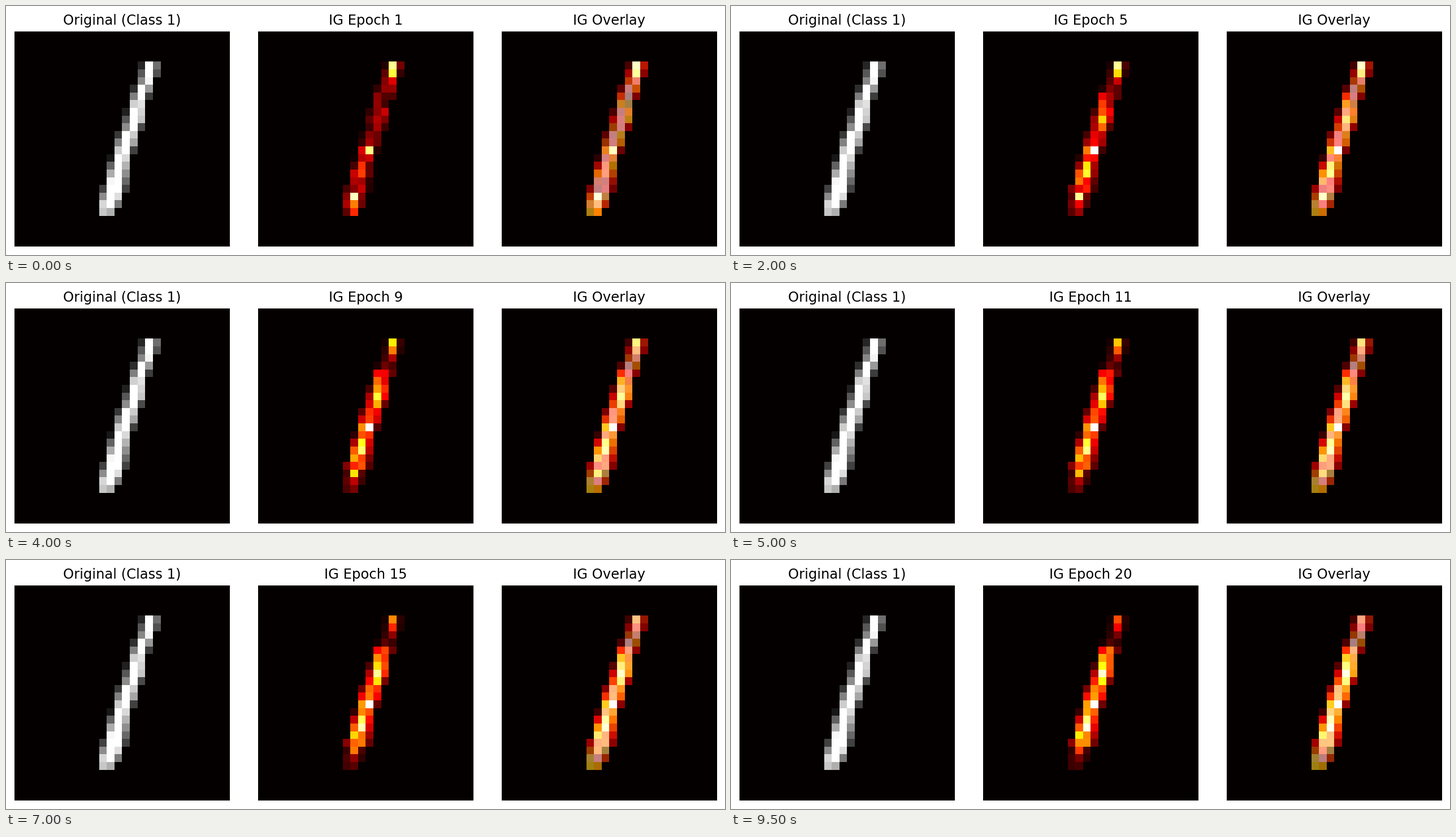
A matplotlib script for the animation above (10000 ms loop, 1272x440 px).

```python
import numpy as np
import matplotlib.pyplot as plt
from matplotlib.animation import FuncAnimation

W, H = 1272, 440
SIZE, EPOCHS = 28, 20
PANEL, PANEL_TOP, BASELINE = 380.4, 45, 33
FIRST_X, PITCH = 14.8, 431.2
BLACK = np.array([5, 0, 0]) / 255

# Corner points (row, column) of the two sides of the stroke
LEFT_SIDE = [(4, 16.85), (6, 16.47), (7, 15.82), (10, 14.87), (12, 14.45),
             (13, 13.78), (22, 11.16), (23, 11.22)]
RIGHT_SIDE = [(4, 18.43), (5, 18.32), (9, 16.88), (11, 16.78), (13, 15.8),
              (14, 15.65), (16, 14.85), (20, 14.26), (22, 13.48), (23, 12.69)]
TOP_ROW, LAST_ROW = 4, 23
BODY = (8, 20)

# Levels below are given at these epochs
KEY_EPOCHS = (1, 5, 20)
CORE_LEVEL = (0.15, 0.28, 0.53)
LEFT_LEVEL = (0.28, 0.58, 0.75)
RIGHT_LEVEL = (0.28, 0.40, 0.60)
TIP_LEVEL = (0.25, 0.18, 0.10)

# Hot spots on the core: row, spread, strength at the key epochs
SPOTS = [(4, 1.1, (0.75, 0.75, 0.38)),
         (11, 0.9, (0.10, 0.40, 0.42)),
         (15, 0.5, (0.70, 0.75, 0.50)),
         (17.6, 0.6, (0.48, 0.72, 0.55)),
         (21, 0.5, (0.80, 0.75, 0.35)),
         (23, 0.8, (0.30, 0.12, 0.03))]


def draw_digit():
    """Coverage of each cell by the stroke."""
    digit = np.zeros((SIZE, SIZE))
    cols = np.arange(SIZE)
    for row in range(TOP_ROW, LAST_ROW + 1):
        a = np.interp(row, *zip(*LEFT_SIDE))
        b = np.interp(row, *zip(*RIGHT_SIDE))
        digit[row] = np.clip(np.minimum(b, cols + 1) - np.maximum(a, cols), 0, 1)
    return digit


def level(values, epoch):
    """Change is fast at first, so blend in the logarithm of the epoch."""
    return np.interp(np.log(epoch), np.log(KEY_EPOCHS), values)


def spot_heat(row, epoch):
    return sum(level(strength, epoch) * np.exp(-((row - centre) / spread) ** 2 / 2)
               for centre, spread, strength in SPOTS)


def attribution(epoch):
    """Input times sensitivity: rims and core, uneven while training is young."""
    gain = np.zeros((SIZE, SIZE))
    for row in range(TOP_ROW, LAST_ROW + 1):
        cells = np.flatnonzero(digit[row])
        inside = BODY[0] <= row <= BODY[1]
        left, core, right = (level(key if inside else TIP_LEVEL, epoch)
                             for key in (LEFT_LEVEL, CORE_LEVEL, RIGHT_LEVEL))
        gain[row, cells] = core
        gain[row, cells[0]] = left
        if len(cells) > 2:
            gain[row, cells[-1]] = right
    fade = 1 - np.log(epoch) / np.log(EPOCHS)
    gain *= 1 + 0.6 * fade * unevenness

    for row in range(TOP_ROW, LAST_ROW + 1):
        cells = np.flatnonzero(digit[row])
        middle = cells[1:-1] if len(cells) > 2 else cells[1:]
        gain[row, middle] += spot_heat(row, epoch)
    return np.clip(digit * gain, 0, 1)


def colour(values, cmap):
    return plt.get_cmap(cmap)(values)[..., :3]


def on_black(rgb):
    return np.where(digit[..., None] > 0, rgb, BLACK)


def add_panel(index, title):
    x = FIRST_X + PITCH * index
    ax = fig.add_axes([x / W, 1 - (PANEL_TOP + PANEL) / H, PANEL / W, PANEL / H])
    ax.axis("off")
    image = ax.imshow(on_black(colour(digit, "gray")), interpolation="nearest", aspect="auto")
    label = fig.text((x + PANEL / 2) / W, 1 - BASELINE / H, title, fontsize=17.5,
                     ha="center", va="baseline", color="black")
    return image, label


def update(frame):
    epoch = frame + 1
    heat = colour(attribution(epoch), "hot")
    heat_image.set_data(on_black(heat))
    overlay_image.set_data(on_black((heat + colour(digit, "hot")) / 2))
    heat_label.set_text(f"IG Epoch {epoch}")
    return heat_image, overlay_image, heat_label


plt.rcParams["font.family"] = "DejaVu Sans"
digit = draw_digit()
unevenness = np.random.default_rng(4).uniform(-1, 1, digit.shape)
fig = plt.figure(figsize=(W / 100, H / 100), dpi=100, facecolor="white")
add_panel(0, "Original (Class 1)")
heat_image, heat_label = add_panel(1, "IG Epoch 1")
overlay_image, _ = add_panel(2, "IG Overlay")

anim = FuncAnimation(fig, update, frames=EPOCHS, interval=500, repeat=True, repeat_delay=0)
plt.show()
```
